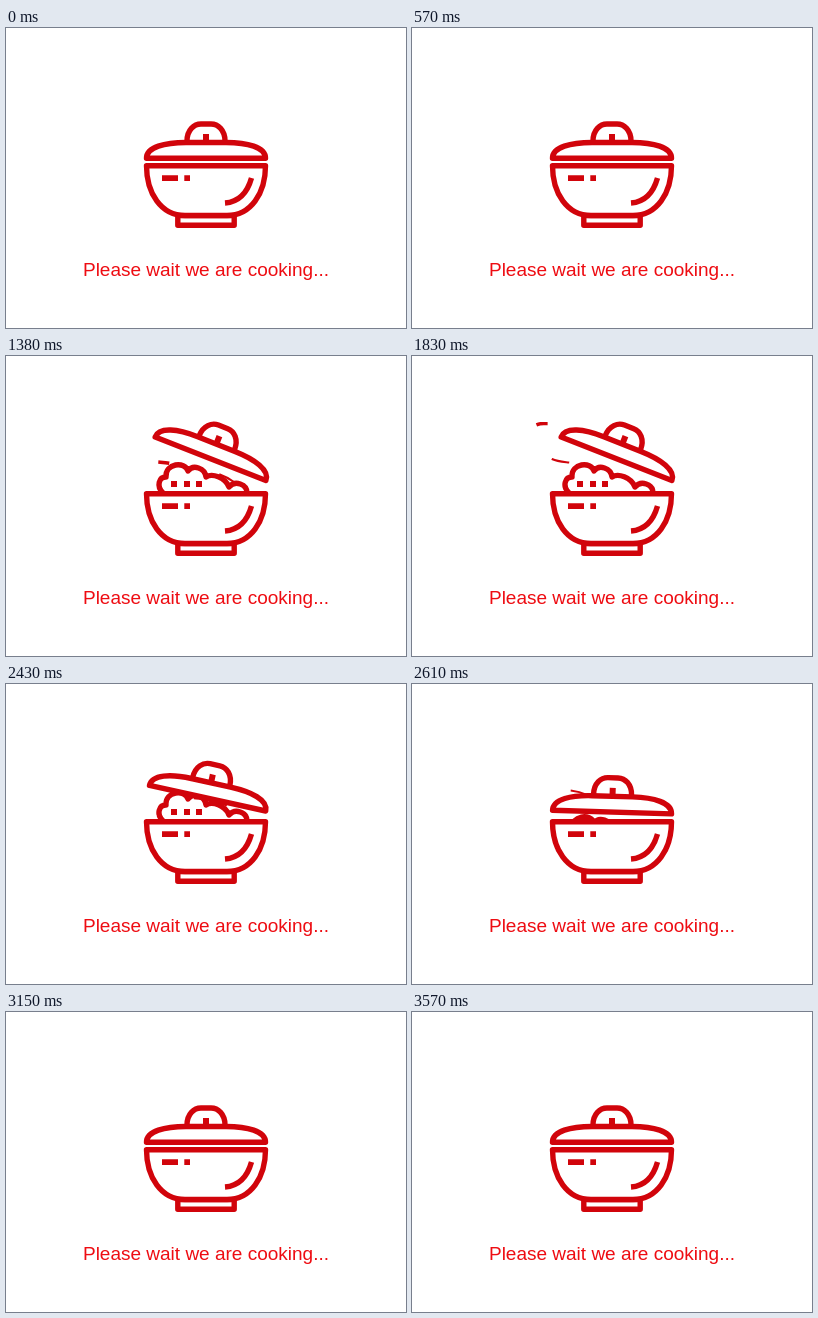
Write an HTML page that moves like this. It is 400 px wide and 300 px high and loops after 3600 ms.

```html
<!DOCTYPE html>
<html lang="en">
<head>
<meta charset="utf-8">
<title>Cooking</title>
<style>
html, body { margin: 0; width: 100%; height: 100%; overflow: hidden; background: #fff; }
svg { display: block; width: 100vw; height: 100vh; }
.line { fill: #fff; stroke: #d1040b; stroke-width: 5.4; stroke-linejoin: round; }
.open { fill: none; }
.solid { fill: #d1040b; }
text { font: 19px "Liberation Sans", Arial, sans-serif; fill: #ee0c12; }
</style>
</head>
<body>
<svg viewBox="0 0 400 300">
  <clipPath id="top"><rect y="66" width="400" height="80"/></clipPath>
  <g id="rice">
    <path class="line" d="M157 137C150 130 153 121 160 121C159 107 179 105 182 115C187 108 199 112 200 121C206 117 219 121 223 131C229 124 241 128 241 137"/>
    <path class="solid" d="M165 125h6v6h-6zM178 125h6v6h-6zM190 125h6v6h-6z"/>
  </g>
  <g id="steam" clip-path="url(#top)"></g>
  <g id="lid">
    <path class="line" d="M181 113C181 102 188 96 195 96H205C212 96 219 102 219 113"/>
    <path class="solid" d="M197 106h6v8h-6z"/>
    <path class="line" d="M140.5 130.3H259.5C259.5 119 241 114.5 220 114.5H180C159 114.5 140.5 119 140.5 130.3Z"/>
  </g>
  <path class="line" d="M171.8 187.5H228.2V197.3H171.8Z"/>
  <path class="line" d="M140.5 137.7H259.5C259.5 165 245 187.5 221 187.5H179C155 187.5 140.5 165 140.5 137.7Z"/>
  <path class="solid" d="M156 147.3h16v5.7h-16zM178.3 147.3h5.7v5.7h-5.7z"/>
  <path class="line open" d="M245.5 150C241 166 232 174 219 175"/>
  <text x="200" y="248" text-anchor="middle">Please wait we are cooking...</text>
</svg>
<script>
const LOOP = 3600, SPEED = 0.168;
const CURVE = "M228 126C205 110 190 118 175 111S150 108 140 103S115 94 115 83C115 73 123 67 133 67.5S146 66 150 60";
const lid = document.getElementById("lid");
const rice = document.getElementById("rice");

// Each wisp runs along the curve from its start to its end time
const wisps = [
  { start: 943, end: 1960, size: 11, width: 3.5 },
  { start: 1336, end: 2170, size: 18, width: 2 },
  { start: 2280, end: 2640, size: 34, width: 2 }
].map(w => {
  const el = document.createElementNS("http://www.w3.org/2000/svg", "path");
  el.setAttribute("d", CURVE);
  el.setAttribute("class", "line open");
  el.style.strokeWidth = w.width;
  document.getElementById("steam").append(el);
  return { ...w, el };
});

const clamp = v => Math.max(0, Math.min(1, v));
const ease = v => (1 - Math.cos(Math.PI * clamp(v))) / 2;

function draw(t) {
  const open = ease((t - 890) / 490) - ease((t - 2210) / 490);
  lid.setAttribute("transform",
    `translate(${0.5 * open} ${-5.7 * open}) rotate(${21.5 * open} 259.5 130)`);
  rice.setAttribute("transform", `translate(0 ${32 * (1 - clamp(open / 0.32))})`);
  rice.style.display = open > 0.01 ? "" : "none";

  for (const w of wisps) {
    const pos = (t - w.start) * SPEED;
    const from = Math.max(0, pos - w.size / 2);
    const len = Math.max(0, pos + w.size / 2 - from);
    w.el.style.display = t >= w.start && t < w.end ? "" : "none";
    w.el.setAttribute("stroke-dasharray", `0 ${from} ${len} 999`);
  }
}

const began = performance.now();
function tick() {
  draw((performance.now() - began) % LOOP);
  requestAnimationFrame(tick);
}
tick();
</script>
</body>
</html>
```
